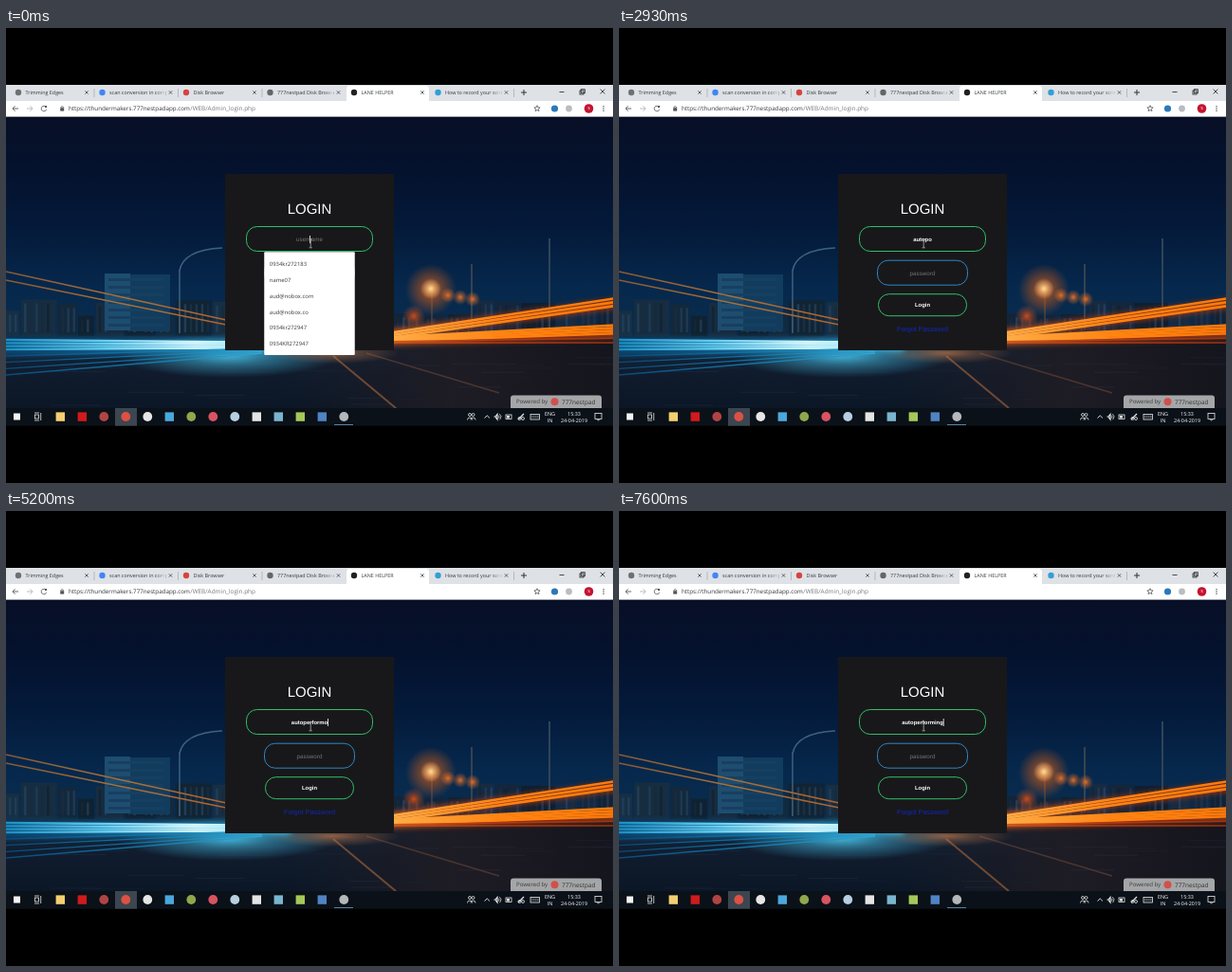
These frames come from a looping animation (640 px wide and 480 px high, 8000 ms). An HTML page with a canvas:

```html
<!DOCTYPE html>
<html lang="en">
<head>
<meta charset="utf-8">
<title>Login form</title>
<style>
html, body { margin: 0; width: 100%; height: 100%; overflow: hidden; background: #000; }
canvas { display: block; }
</style>
</head>
<body>
<canvas id="stage" width="640" height="480"></canvas>
<script>
const LOOP = 8000;
const BLINK = 600;
const UI = '"Open Sans", "Noto Sans", sans-serif';
const FORM = '"Liberation Sans", Arial, sans-serif';
const GREEN = '#2fbf6c';

const stage = document.getElementById('stage').getContext('2d');
const still = document.createElement('canvas');
still.width = 640;
still.height = 480;
let g = still.getContext('2d');

// ---- drawing helpers, all painting on the current context g ----
function rect(x, y, w, h, color) {
  g.fillStyle = color;
  g.fillRect(x, y, w, h);
}
function box(x, y, w, h, color) {
  g.strokeStyle = color;
  g.lineWidth = 0.8;
  g.strokeRect(x, y, w, h);
}
function disc(x, y, r, color) {
  g.fillStyle = color;
  g.beginPath();
  g.arc(x, y, r, 0, Math.PI * 2);
  g.fill();
}
function ring(x, y, r, color, from = 0, to = Math.PI * 2) {
  g.strokeStyle = color;
  g.lineWidth = 0.8;
  g.beginPath();
  g.arc(x, y, r, from, to);
  g.stroke();
}
function line(color, width, ...p) {
  g.strokeStyle = color;
  g.lineWidth = width;
  g.beginPath();
  for (let i = 0; i < p.length; i += 2) g.lineTo(p[i], p[i + 1]);
  g.stroke();
}
function pill(x, y, w, h, r, fill, border) {
  g.beginPath();
  g.roundRect(x, y, w, h, r);
  if (fill) { g.fillStyle = fill; g.fill(); }
  if (border) { g.strokeStyle = border; g.lineWidth = 1; g.stroke(); }
}
function text(s, x, y, size, color, align = 'left', font = UI, weight = 400) {
  g.textRendering = 'geometricPrecision';
  g.font = `${weight} ${size}px ${font}`;
  g.textAlign = align;
  g.fillStyle = color;
  g.fillText(s, x, y + size * 0.36);
  return g.measureText(s).width;
}
function shade(x0, y0, x1, y1, ...colors) {
  const grad = g.createLinearGradient(x0, y0, x1, y1);
  colors.forEach((c, i) => grad.addColorStop(i / (colors.length - 1), c));
  return grad;
}
function glow(x, y, r, rgb, squash = 1, alpha = 1) {
  g.save();
  g.translate(x, y);
  g.scale(1, squash);
  const grad = g.createRadialGradient(0, 0, 0, 0, 0, r);
  grad.addColorStop(0, `rgba(${rgb},${alpha})`);
  grad.addColorStop(0.4, `rgba(${rgb},${alpha * 0.5})`);
  grad.addColorStop(1, `rgba(${rgb},0)`);
  rect(-r, -r, 2 * r, 2 * r, grad);
  g.restore();
}
function seeded(seed) {
  return () => (seed = (seed * 16807) % 2147483647) / 2147483647;
}

// ---- night road behind the form ----
function skyline(from, to, base, height, hue, random) {
  for (let x = from; x < to;) {
    const w = 14 + random() * 24, h = height * (0.45 + random() * 0.55);
    rect(x, base - h, w, h, `hsl(${hue} 50% ${12 + random() * 6}%)`);
    for (let wx = x + 3; wx < x + w - 3; wx += 6) {
      rect(wx, base - h + 4, 2.5, h - 8, `hsl(${hue} 45% ${13 + random() * 12}%)`);
    }
    x += w + 2;
  }
}
// Light trails running from one vertical edge to another, spread evenly.
function trails(n, x0, top0, end0, x1, top1, end1, paint, width) {
  for (let i = 0; i < n; i++) {
    const k = i / (n - 1);
    line(paint, width, x0, top0 + (end0 - top0) * k, x1, top1 + (end1 - top1) * k);
  }
}
function drawScene() {
  const random = seeded(41);
  g.save();
  g.beginPath();
  g.rect(0, 93, 640, 308);
  g.clip();
  rect(0, 93, 640, 240, shade(0, 93, 0, 333, '#080f26', '#04122e', '#041a3b', '#06284c', '#0b2d4e'));

  skyline(0, 231, 325, 40, 208, random);
  rect(131, 260, 42, 60, '#113c5e');
  rect(104, 259, 27, 60, '#1d4d70');
  for (let y = 264; y < 315; y += 8) rect(108, y, 58, 3, '#173f5f');
  skyline(409, 640, 325, 48, 212, random);

  const steel = '#3d6280';
  line(steel, 1.5, 183, 322, 183, 255);
  g.beginPath();
  g.moveTo(183, 256);
  g.quadraticCurveTo(187, 234, 228, 232);
  g.stroke();
  line('#2f4459', 2, 573, 222, 573, 318);
  line('#4a4c52', 1.5, 491, 249, 491, 318);
  line('#4c4240', 1.5, 449, 276, 449, 322);

  // road surface
  rect(0, 326, 640, 75, shade(0, 326, 0, 401, '#16293f', '#101c2d', '#0b1626'));
  rect(300, 326, 340, 75, shade(300, 0, 640, 0, '#1e1c2400', '#1e1c24', '#15151e'));
  for (let i = 0; i < 40; i++) {
    const x = random() * 640, y = 345 + random() * 54;
    rect(x, y, 20 + random() * 50, 1, `rgba(70,95,120,${random() * 0.16})`);
  }
  line('#6f4a34', 2, 345, 346, 411, 401);
  line('#4a3530', 1.5, 380, 343, 520, 385);

  // cool trails
  const amber = shade(0, 0, 232, 0, '#8a5a35', '#a5703a', '#b5622c');
  const ice = shade(0, 0, 300, 0, '#1a8fc4', '#63cdf0', '#d5f8ff', '#8fe6fb');
  const blue = shade(0, 0, 300, 0, '#0a4a78', '#1377ab', '#39b4dd');
  trails(2, 0, 257, 266, 232, 308, 313, amber, 1.4);
  glow(235, 346, 115, '70,190,228', 0.2, 0.9);
  glow(345, 343, 70, '190,120,75', 0.16, 0.7);
  g.filter = 'blur(3px)';
  trails(2, -20, 332, 342, 300, 333, 337, blue, 8);
  g.filter = 'blur(.7px)';
  trails(4, 0, 329, 339, 300, 332, 337, ice, 2.4);
  trails(4, 0, 346, 366, 270, 338, 343, blue, 1.4);

  // warm trails
  const fire = shade(400, 0, 640, 0, '#ffb04a', '#ff8412', '#ff7a08');
  const ember = shade(400, 0, 640, 0, '#d2571c', '#b23a12', '#a0350f');
  g.filter = 'blur(3px)';
  trails(2, 390, 325, 330, 650, 290, 322, ember, 9);
  g.filter = 'blur(.6px)';
  trails(3, 390, 324, 329, 650, 284, 292, fire, 2.6);
  trails(4, 390, 327, 331, 650, 313, 322, fire, 2.6);
  trails(2, 390, 331, 332, 650, 327, 332, ember, 1.6);
  g.filter = 'none';

  glow(448, 276, 27, '215,95,25');
  glow(448, 275, 11, '255,220,150');
  for (let i = 0; i < 3; i++) glow(466 + i * 13, 282 + i * 2, 8, '225,110,40');
  glow(430, 304, 12, '200,75,25');
  g.restore();
}

// ---- browser window ----
function cross(x, y, r, color) {
  line(color, 0.8, x - r, y - r, x + r, y + r);
  line(color, 0.8, x + r, y - r, x - r, y + r);
}
function arrow(x, dir, color) {
  line(color, 0.9, x - 3 * dir, 85, x + 3 * dir, 85);
  line(color, 0.9, x + 0.5 * dir, 82.3, x + 3 * dir, 85, x + 0.5 * dir, 87.7);
}
function drawTab(label, color, i) {
  const x = 13 + i * 88.5;
  const back = i === 4 ? '#ffffff' : '#dee1e6';
  disc(x, 68, 3.2, color);
  g.save();
  g.beginPath();
  g.rect(x + 7, 61, 60, 15);
  g.clip();
  text(label, x + 7.5, 68, 5.4, '#33363a');
  rect(x + 57, 62, 10, 13, shade(x + 57, 0, x + 67, 0, back + '00', back));
  g.restore();
  cross(x + 72, 68, 1.7, '#444');
  if (i < 3 || i === 5) line('#9a9da2', 0.6, x + 80, 64, x + 80, 73);
}
function drawBrowser() {
  rect(0, 60, 640, 17, '#dee1e6');
  rect(0, 77, 640, 16.6, '#fff');
  pill(359, 61, 87, 17, [3, 3, 0, 0], '#fff');
  drawTab('Trimming Edges', '#707070', 0);
  drawTab('scan conversion in computer', '#4285f4', 1);
  drawTab('Disk Browser', '#d5443f', 2);
  drawTab('777nestpad Disk Browser', '#666', 3);
  drawTab('LANE HELPER', '#222', 4);
  drawTab('How to record your screen', '#2f9fd6', 5);
  line('#333', 1, 543, 68, 549, 68);
  line('#333', 1, 546, 65, 546, 71);
  line('#222', 0.8, 583.5, 67.5, 588.5, 67.5);
  box(605, 66, 4, 4, '#222');
  box(606.3, 64.7, 4, 4, '#222');
  cross(629, 67, 2.4, '#222');

  arrow(10, -1, '#555');
  arrow(25, 1, '#b5b5b5');
  ring(40, 85, 2.8, '#555', 0.3, 5.3);
  rect(41, 82, 2, 2, '#555');
  rect(57.2, 84.2, 4, 3.4, '#555');
  ring(59.2, 84, 1.3, '#555', Math.PI, 0);
  text('https://thundermakers.777nestpadapp.com', 66, 84.6, 6.25, '#33363a');
  text('/WEB/Admin_login.php', 194.3, 84.6, 6.4, '#73777c');

  g.beginPath();
  for (let i = 0; i < 10; i++) {
    const a = i * Math.PI / 5 - Math.PI / 2, r = i % 2 ? 1.5 : 3.3;
    g.lineTo(560 + r * Math.cos(a), 85 + r * Math.sin(a));
  }
  g.closePath();
  g.strokeStyle = '#555';
  g.stroke();
  disc(578.5, 85, 3.6, '#2b78b9');
  disc(593.5, 85, 3.4, '#b9bcc0');
  disc(614.5, 85, 4.8, '#c4122f');
  text('s', 614.5, 84.4, 5.5, '#fff', 'center');
  for (let i = -1; i < 2; i++) disc(630, 85 + i * 2.3, 0.75, '#555');
}

// ---- taskbar ----
function drawTaskbar() {
  const pale = '#e8e8e8';
  const squares = { 0: '#f3cf70', 1: '#cf1b1b', 5: '#4aa8de', 9: '#e4e4e4', 10: '#79b5cf', 11: '#a5c85a', 12: '#4f83c4' };
  const discs = { 2: '#b04444', 3: '#dd5144', 4: '#e6e6e6', 6: '#8fa84c', 7: '#d95361', 8: '#b7cfe0', 13: '#b4b8ba' };
  const at = i => 57.3 + i * 23;
  rect(0, 401, 640, 18.7, '#0b1118');
  rect(115, 401, 23, 18.7, '#3c4650');
  rect(346, 418, 20, 0.9, '#5f8fb5');
  for (const i in squares) rect(at(i) - 4.7, 405.4, 9.4, 9.4, squares[i]);
  for (const i in discs) disc(at(i), 410, 4.9, discs[i]);

  rect(8, 406.5, 7, 7, '#f4f4f4');
  box(30.5, 408, 4, 4, pale);
  line(pale, 0.8, 36.7, 406, 36.7, 414);
  for (const y of [406, 414]) line(pale, 0.8, 30, y, 35, y);

  for (const dx of [0, 3.5]) {
    ring(489 + dx, 408, 1.5, pale);
    ring(489 + dx, 413.5, 2.5, pale, Math.PI, 0);
  }
  line(pale, 0.9, 504.5, 411.5, 507.2, 408.8, 510, 411.5);
  line(pale, 1.2, 514.5, 410, 516, 410, 518, 407.5, 518, 413, 516, 410.5);
  for (const r of [2, 3.8]) ring(518, 410.2, r, pale, -0.9, 0.9);
  box(527, 408, 6, 4.5, pale);
  rect(528, 409, 3, 2.6, pale);
  line(pale, 1.2, 540, 413, 546, 407);
  for (const x of [541.5, 545]) ring(x, 412, 1.5, pale);
  box(553, 407.5, 9.5, 5.5, pale);
  for (let i = 0; i < 8; i++) rect(554.4 + i % 4 * 2, 408.8 + (i >> 2) * 1.7, 1, 0.8, pale);
  text('ENG', 573.5, 406.6, 5.5, '#fff', 'center');
  text('IN', 573.5, 414, 5.5, '#fff', 'center');
  text('15:33', 599, 406.6, 5.4, '#fff', 'center');
  text('24-04-2019', 599, 414, 5.4, '#fff', 'center');
  box(621, 406.5, 7, 6, pale);
  line(pale, 0.8, 623, 412.5, 624.5, 414.3, 626, 412.5);
}

function drawBadge() {
  pill(532, 387.5, 96, 13.5, [3, 3, 0, 0], '#a5a6a8');
  text('Powered by', 538, 394.2, 6.1, '#3b3b3b');
  disc(578.5, 394.3, 4, '#d2504b');
  text('777nestpad', 586, 394.2, 6.45, '#333');
}

function drawForm() {
  rect(231, 154, 178, 186, '#18181a');
  text('LOGIN', 320, 190.5, 15, '#fff', 'center', FORM);
  pill(253.5, 209.5, 133, 26, 11.2, null, GREEN);
  pill(272.5, 245.2, 95, 26, 11.2, null, '#2f86c4');
  text('password', 320, 258.3, 6.3, '#757575', 'center', FORM);
  pill(273.5, 280.7, 93, 23, 11.2, null, GREEN);
  text('Login', 320, 292.3, 5.9, '#fff', 'center', FORM, 700);
  text('Forgot Password', 320, 317.3, 7.15, '#0f28c4', 'center', FORM);
}

// ---- typing ----
const RECENT = ['0934kr272183', 'name07', 'aud@nobox.com', 'aud@nobox.co', '0934kr272947', '0934KR272947'];
const SAVED = ['aud@nobox.co', 'aud@nobox.com', 'autoperforming', 'arclearner'];
const FOCUSED = 130 - BLINK;
const KEYS = [
  [1200, 'a'], [1400, 'u'], [1530, 't'], [1730, 'o'], [1930, 'p'],
  [2200, 'o'], [3400, 'Back'], [3600, 'e'], [3800, 'r'], [4330, 'f'],
  [4600, 'o'], [4730, 'r'], [5000, 'm'], [5200, 'o'], [6400, 'Back'],
  [6400, 'Esc'], [6730, 'i'], [6930, 'n'], [7330, 'g'],
];

function fieldAt(t) {
  let value = '', last = FOCUSED, open = true;
  for (const [time, key] of KEYS) {
    if (time > t) break;
    last = time;
    open = key !== 'Esc';
    if (key === 'Back') value = value.slice(0, -1);
    else if (open) value += key;
  }
  // The second letter already narrows the list to the word being typed.
  const matches = SAVED.filter(s => s.startsWith(value) && s !== value && !(value.length > 1 && s.includes('@')));
  const list = !open ? [] : value ? matches : RECENT;
  return { value, list, caret: Math.floor((t - last) / BLINK) % 2 === 0 };
}

function drawList(items) {
  if (!items.length) return;
  const width = items === RECENT ? 95.5 : 133.2;
  const x = 320 - width / 2;
  pill(x, 236.3, width, 8 + items.length * 16.8, 1, '#fff');
  items.forEach((s, i) => text(s, x + 5.6, 249 + i * 16.8, 5.9, '#3a3a3a'));
}

function drawPointer() {
  const gray = '#b5b5b5';
  line(gray, 0.8, 321.2, 223, 321.2, 231.5);
  for (const y of [222.8, 231.8]) line(gray, 0.8, 319.6, y, 322.8, y);
}

function frame(now) {
  const { value, list, caret } = fieldAt(now % LOOP);
  g = stage;
  g.drawImage(still, 0, 0);
  let width = 0;
  if (value) width = text(value, 320, 222.6, 5.9, '#fff', 'center', FORM, 700);
  else text('username', 320, 222.6, 6.3, '#757575', 'center', FORM);
  if (caret) rect(320 + width / 2, 219, 0.8, 8, '#fff');
  drawList(list);
  drawPointer();
  requestAnimationFrame(frame);
}

rect(0, 0, 640, 480, '#000');
drawScene();
drawBrowser();
drawBadge();
drawForm();
drawTaskbar();
requestAnimationFrame(frame);
</script>
</body>
</html>
```
